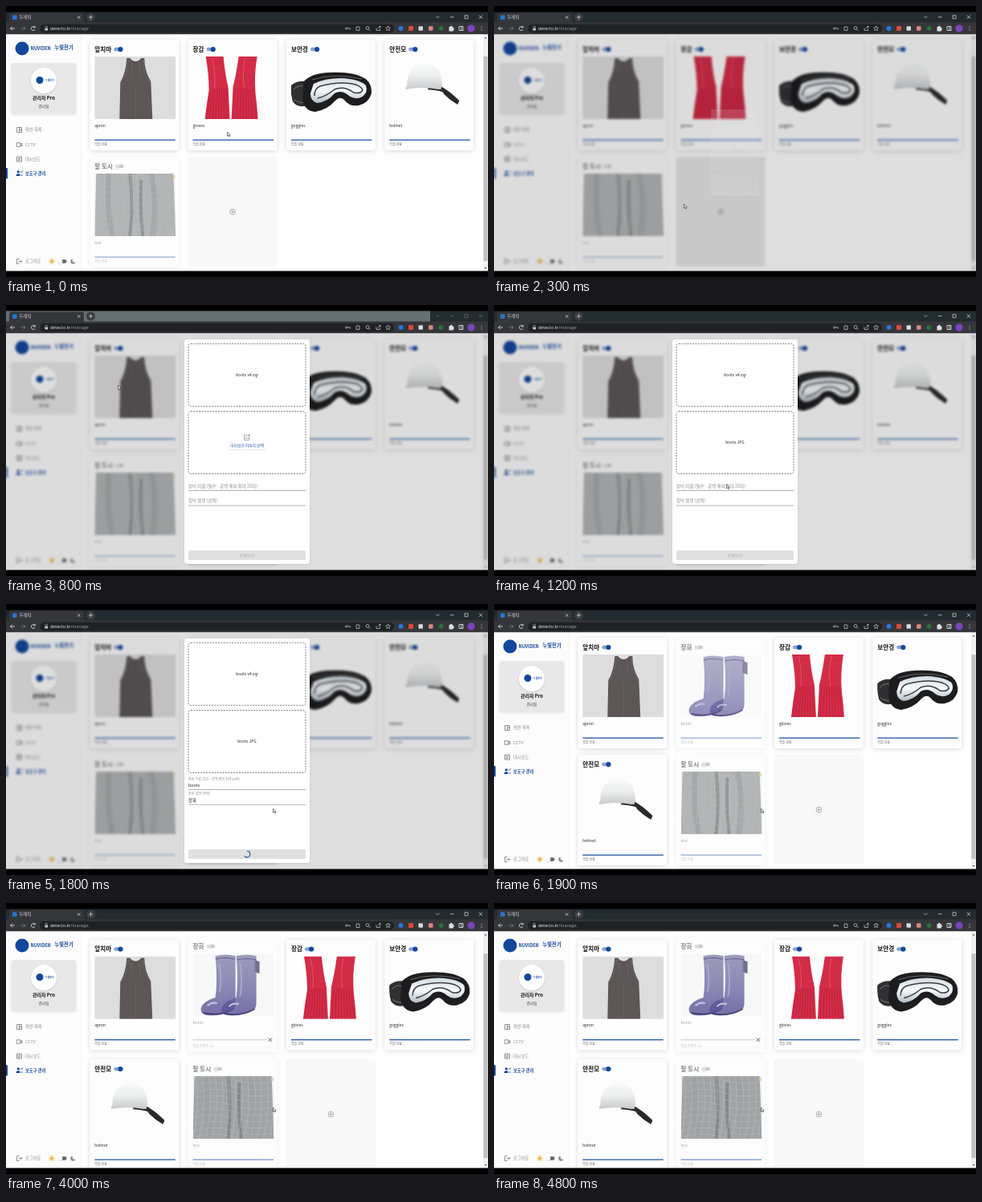
Write an HTML page with a canvas that moves like this. It is 600x338 px and loops after 5 s.

```html
<!DOCTYPE html>
<html lang="ko">
<head>
<meta charset="utf-8">
<title>Equipment manager</title>
<style>
html, body { margin: 0; width: 100%; height: 100%; overflow: hidden; background: #000; }
canvas { display: block; width: 100vw; height: 100vh; }
</style>
</head>
<body>
<canvas id="stage" width="600" height="338"></canvas>
<script>
const W = 600, H = 338, LOOP = 5000, TOP = 35.2, BOTTOM = 330.5;
const BLUE = '#12489c', GREY = '#8b8b8b';
const KR = '"Noto Sans CJK KR", "Noto Sans CJK", sans-serif';
const screen = document.getElementById('stage').getContext('2d');
const layer = Object.assign(document.createElement('canvas'), { width: W, height: H });
const page = layer.getContext('2d');
let g = screen;

function text(s, x, y, size, color = '#222', weight = 400, align = 'left', font = KR) {
  g.font = `${weight} ${size}px ${font}`;
  g.textAlign = align;
  g.textBaseline = 'alphabetic';
  g.fillStyle = color;
  g.fillText(s, x, y + size * 0.36);
  return g.measureText(s).width;
}
function rect(color, x, y, w, h, r = 0) {
  g.fillStyle = color;
  g.beginPath();
  g.roundRect(x, y, w, h, r);
  g.fill();
}
function disc(color, x, y, r) {
  g.fillStyle = color;
  g.beginPath();
  g.arc(x, y, r, 0, 7);
  g.fill();
}
function fill(color, d) {
  g.fillStyle = color;
  g.fill(new Path2D(d));
}
function line(color, width, d) {
  g.strokeStyle = color;
  g.lineWidth = width;
  g.stroke(new Path2D(d));
}
function at(x, y, draw) {
  g.save();
  g.translate(x, y);
  draw();
  g.restore();
}
function shadow(blur, alpha, draw) {
  g.save();
  g.shadowColor = `rgba(0,0,0,${alpha})`;
  g.shadowBlur = blur;
  g.shadowOffsetY = 1;
  draw();
  g.restore();
}
function blend(y0, y1, ...colors) {
  const grad = g.createLinearGradient(0, y0, 0, y1);
  colors.forEach((c, i) => grad.addColorStop(i / (colors.length - 1), c));
  return grad;
}

// Item pictures, each in a 101 x 78 box
const pictures = {
  apron() {
    rect('#dedddd', 0, 0, 101, 78);
    fill('#5c5657', 'M40 2L44 2Q47 6 51 6Q55 6 58 2L62 2Q62 18 70 31L72 78L31 78L32 32Q39 20 40 2Z');
    line('#777071', 0.5, 'M33 32Q41 23 42 3M69 32Q61 23 60 3M46 8V24M56 8V24M51 36V78');
  },
  gloves() {
    fill('#d32c47', 'M16 0H38Q40 22 44 38L46 78H15Q17 60 20 42Q20 22 16 0Z');
    fill('#d32c47', 'M57 0H80Q76 24 78 46Q80 62 81 78H48L50 38Q54 22 57 0Z');
    let ribs = '';
    for (let i = 0; i < 8; i++) {
      ribs += `M${22 + i * 2.8} 40L${17 + i * 3.7} 78M${53 + i * 3.1} 40L${51 + i * 3.9} 78`;
    }
    line('#b31c38', 0.6, ribs);
    line('#e6526a', 1, 'M24 2Q29 22 27 40M65 2Q61 22 64 40');
  },
  goggles() {
    fill('#302f31', 'M0 36Q7 30 17 31L23 60Q9 66 2 56Q-1 45 0 36Z');
    line('#77777a', 1, 'M3 41Q9 35 16 37M4 54Q11 59 20 57');
    fill('#1d1d1f', 'M15 32Q24 21 46 20Q78 18 93 28Q101 35 100 46Q97 58 84 61Q73 63 66 54' +
      'Q61 49 55 55Q46 66 30 69Q17 68 14 54Z');
    fill(blend(27, 58, '#d3dde4', '#f6f9fa', '#aebbc5'),
      'M28 34Q42 27 62 27Q85 28 93 36Q96 44 89 50Q80 55 72 49Q63 41 54 46Q46 56 33 58Q24 56 24 46Z');
    line('#3a3d41', 1.5, 'M29 49Q29 40 36 37Q58 31 76 34Q87 36 89 42Q86 47 78 45Q66 36 54 41Q43 50 33 52');
    line('#69696c', 1, 'M26 29Q54 20 88 28');
  },
  helmet() {
    line('#29292b', 2.4, 'M48 40Q66 41 74 46L86 57');
    fill('#29292b', 'M62 36Q74 42 87 55L85 60Q76 55 68 47Z');
    fill(blend(8, 42, '#fafafb', '#eceded', '#c6c8cc'),
      'M22 36Q22 11 44 9Q65 10 66 34Q66 41 61 41Q41 37 21 41Q19 39 22 36Z');
    line('#d3d5d9', 0.8, 'M24 33Q44 30 64 36');
  },
  boots() {
    rect('#f8f8f9', 0, 0, 101, 78);
    fill('#4c4870', 'M77 8L83 10V25L77 23Z');
    const boot = 'M28 3Q40 0 53 3L53 62Q53 70 47 71Q37 78 18 77Q9 76 10 68Q13 59 28 55Q31 34 28 3Z';
    const tone = () => blend(0, 78, '#8482a8', '#6e6ba2', '#504890');
    fill(tone(), boot);
    line('#37316a', 2, 'M13 74Q36 79 51 69');
    at(26, 0, () => {
      fill(tone(), boot);
      line('#37316a', 2, 'M13 75Q36 79 51 69');
      line('#b0add0', 2, 'M33 13Q36 36 33 53');
      line('#e6e4f3', 2, 'M19 66Q24 61 31 63');
    });
    line('#b0add0', 2, 'M33 13Q37 34 33 48');
    line('#dfdcf0', 2, 'M18 65Q24 60 30 62');
    line('#4b467e', 1.2, 'M28 7Q40 4 52 7M55 8Q67 5 79 8');
  },
  sleeves() {
    rect('#ececeb', 0, 0, 101, 78);
    g.save();
    g.clip(new Path2D('M2 0H98L101 78H0Z'));
    rect('#8b9094', 0, 0, 101, 78);
    line('#9ba0a3', 7, 'M18 0Q14 38 22 78M70 0Q79 38 72 78');
    line('#7c8186', 4, 'M44 0Q48 36 44 78M58 8Q56 40 60 78');
    let weft = '', warp = '';
    for (let i = 0; i < 13; i++) {
      const a = 4 + i * 8;
      warp += `M${a} 0Q${a + 5} 36 ${a - 4} 78`;
      weft += `M0 ${a}Q26 ${a - 8} 50 ${a}T101 ${a + 3}`;
    }
    line('#c5c2b4', 0.6, warp);
    line('#b7bac0', 0.6, weft);
    g.restore();
    rect('#d9c38a', 97, 2, 3, 4);
  }
};
const items = {
  apron: ['앞치마', 'apron'], gloves: ['장갑', 'gloves'], goggles: ['보안경', 'goggles'],
  helmet: ['안전모', 'helmet'], boots: ['장화', 'boots', true], sleeves: ['팔 토시', 'tosi', true]
};

function toggle(x, y, on, track = on ? '#86a3d0' : '#999') {
  rect(track, x + 0.5, y - 2.2, 10.5, 4.4, 2.2);
  if (on) return disc(BLUE, x + 8.7, y, 3.1);
  shadow(1.5, 0.15, () => disc('#fff', x + 3, y, 2.9));
}

function card(key, x, y, training, imageAlpha) {
  const [title, label, off] = items[key];
  const h = training === null ? 138 : 144.5;
  shadow(6, off ? 0.08 : 0.16, () => rect('#fdfdfd', x, y, 111, h, 3));
  at(x + 6, y, () => {
    g.globalAlpha = off ? 0.5 : 1;
    const w = text(title, 0, 12, 7.6, '#161616', 700);
    toggle(w + 2.5, 12, !off);
    g.globalAlpha = off ? imageAlpha : 1;
    g.save();
    g.beginPath();
    g.rect(0, 21, 101, 78.5);
    g.clip();
    g.translate(0, 21);
    pictures[key]();
    g.restore();
    g.globalAlpha = off ? 0.4 : 1;
    text(label, 0, 107, 4.9);
    if (training === null) {
      g.globalAlpha = off ? imageAlpha - 0.15 : 1;
      rect('#1a52a4', 0, 124.4, 100.5, 1.4);
      g.globalAlpha = off ? 0.4 : 1;
      text('학습 완료', 0, 130.3, 4, '#666');
    } else {
      rect('#8e8ea0', 0, 128, 92, 1.2);
      text(`학습 진행중 ${training}%`, 0, 136.5, 4, '#666');
      g.globalAlpha = 0.85;
      line('#333', 0.9, 'M94 126.3l4.6 4.6m0 -4.6l-4.6 4.6');
    }
  });
}

function addCard(x, y, hover) {
  rect(hover ? '#e6e6e6' : '#f8f8f9', x, y, 111, 137, 3);
  at(x + 55.5, y + 68.5, () =>
    line('#8c8c8c', 0.7, 'M3.4 0A3.4 3.4 0 1 1 -3.4 0A3.4 3.4 0 1 1 3.4 0M-1.9 0H1.9M0 -1.9V1.9'));
}

function sidebar() {
  shadow(3, 0.1, () => rect('#fcfcfc', 0, TOP, 93, 300));
  disc(BLUE, 20, 53, 8.5);
  text('NUVIDEN', 30.5, 53, 5.6, BLUE, 700);
  text('누빛전기', 60.5, 52, 6.3, BLUE, 700);
  shadow(3, 0.1, () => rect('#e8e8e8', 6.5, 71, 81, 64, 4));
  shadow(3, 0.12, () => disc('#fff', 47, 93, 16));
  disc(BLUE, 42, 92.5, 4.5);
  text('누빛전기', 49, 92.5, 2.9, BLUE, 700);
  text('관리자 Pro', 47, 115, 6, '#161616', 700, 'center');
  text('관리팀', 47, 125.5, 4.8, '#444', 400, 'center');
  const menu = [
    ['위반 목록', 154.5, 'M-3 -3H3V3H-3ZM0 -3V3M0 0H3'],
    ['CCTV', 173, 'M-3.3 -2.3H1.3V2.3H-3.3ZM1.3 -.5L3.5 -2V2L1.3 .5'],
    ['대시보드', 191, 'M-3 -3H3V3H-3ZM-1.6 -1.3H1.6M-1.6 .2H1.6M-1.6 1.6H.5'],
    ['로그아웃', 318.5, 'M0 -3H-3V3H0M-1 0H3.4M1.7 -1.7L3.4 0L1.7 1.7']
  ];
  for (const [name, y, icon] of menu) {
    at(16.5, y, () => line('#777', 0.8, icon));
    text(name, 24, y, 5.3, GREY);
  }
  rect(BLUE, 0, 202, 2, 13.5, [0, 1, 1, 0]);
  disc(BLUE, 15.3, 206.8, 1.6);
  fill(BLUE, 'M12.5 212Q12.5 209.2 15.5 209.2L17.5 210V212Z');
  line(BLUE, 0.9, 'M18 206.5l1 1l2 -2.2M18.5 211h2.3');
  text('보호구 관리', 24, 208.8, 5.3, BLUE, 700);
  disc('#f3b544', 57, 318.5, 2.3);
  g.setLineDash([0.9, 1.77]);
  line('#f3b544', 1.2, 'M60.4 318.5A3.4 3.4 0 1 1 53.6 318.5A3.4 3.4 0 1 1 60.4 318.5');
  g.setLineDash([]);
  toggle(64.5, 318.5, false, '#666');
  fill('#8d8d8d', 'M83 315.4A3.2 3.2 0 1 0 86.5 319.5A2.8 2.8 0 0 1 83 315.4Z');
}

function scrollbar() {
  rect('#f1f1f1', 594, TOP, 6, BOTTOM - TOP);
  rect('#c1c1c1', 594.5, 63, 5, 255);
  fill('#555', 'M595.5 40.5h3l-1.5 -2zM595.5 326h3l-1.5 2z');
}

function drawPage(step) {
  rect('#fff', 0, 0, W, H);
  sidebar();
  const done = step >= 19, tall = step >= 20;
  const order = done
    ? ['apron', 'boots', 'gloves', 'goggles', 'helmet', 'sleeves']
    : ['apron', 'gloves', 'goggles', 'helmet', 'sleeves'];
  const place = i => [104.3 + (i % 4) * 122.3, i < 4 ? 42 : tall ? 195 : 188];
  order.forEach((key, i) => {
    const [x, y] = place(i);
    const training = key === 'boots' && tall ? (step < 31 ? 0 : 1) : null;
    // Shorter cards are centred in a row that holds a taller one
    const centre = tall && i < 4 && training === null ? 3.5 : 0;
    card(key, x, y + centre, training, tall ? 0.78 : 0.62);
  });
  addCard(...place(order.length), step >= 2 && !done);
  scrollbar();
}

function browser(inactive) {
  rect('#000', 0, 0, W, 8);
  rect('#222c30', 0, 7.5, W, 14);
  if (inactive) rect('#667074', 0, 7.5, 528, 14);
  rect('#35363a', 0, 20.5, W, TOP - 20.5);
  rect('#35363a', 4, 8.5, 93, 13, [3, 3, 0, 0]);
  rect('#2377d2', 8, 11.5, 5.5, 5.5, 1);
  text('두레픽', 16.5, 14.3, 5.3, '#dfe1e5');
  line('#ccc', 0.8, 'M89 12.5l3.4 3.4m0 -3.4l-3.4 3.4');
  disc('#3c3d41', 105.5, 14, 5.5);
  line('#ccc', 0.8, 'M103 14h5m-2.5 -2.5v5');
  line(inactive ? '#65666a' : '#ccc', 0.8,
    'M535.3 12.8l2 2l2 -2M553 13.8h4.5M571 11.8h4v4h-4zM588.7 11.7l4.2 4.2m0 -4.2l-4.2 4.2');
  line('#d4d5d8', 0.9, 'M11 28H5.5M8 25.5L5.5 28L8 30.5M36 26.5A2.5 2.5 0 1 0 36 29.5M36.2 25V27H34.2');
  line('#77787c', 0.9, 'M18.5 28H24M21.5 25.5L24 28L21.5 30.5');
  rect('#202124', 42, 22.8, 441, 10.6, 5.3);
  rect('#c4c5c8', 48.3, 27.4, 3.8, 3, 0.4);
  line('#c4c5c8', 0.6, 'M49 27.4V26.3A1.2 1.2 0 0 1 51.4 26.3V27.4');
  const font = '"Open Sans", sans-serif';
  const w = text('detecto.kr', 55, 28, 5.4, '#eee', 400, 'left', font);
  text('/manage', 55 + w, 28, 5.4, '#9aa0a6', 400, 'left', font);
  line('#b9bbbf', 0.8, 'M422.5 28a1.2 1.2 0 1 0 2.4 0a1.2 1.2 0 1 0 -2.4 0M425 28h3.5v1.5' +
    'M436 26h4v4.5h-4zM448 27.5a2 2 0 1 0 4 0a2 2 0 1 0 -4 0M451.5 29l2 2' +
    'M461 27.5v3h4.5v-2M463 28.5l3 -3M464 25.5h2v2' +
    'M475.7 25l.9 1.9l2 .2l-1.5 1.5l.4 2l-1.8 -1l-1.8 1l.4 -2l-1.5 -1.5l2 -.2z');
  disc('#2477df', 491.5, 28, 3);
  rect('#db493c', 501, 25, 6, 6, 1);
  rect('#d6d7d8', 513.5, 25.3, 5.5, 5.5, 1);
  rect('#d9867e', 526, 25.2, 5.5, 5.5, 1);
  disc('#1f7a34', 541.5, 28, 2.8);
  fill('#dcdde0', 'M551.5 26h1.4a1.2 1.2 0 0 1 2.4 0h1.4v1.6a1.2 1.2 0 0 1 0 2.4v1.4h-5.2z');
  line('#dcdde0', 0.9, 'M564 25.5h5v5h-5zM567 25.5v5');
  disc('#7d43bd', 579, 28, 4.6);
  for (const y of [25.8, 28, 30.2]) disc('#ccc', 592, y, 0.6);
}

function prompt(label, y) {
  at(300, y, () => line('#888', 0.7, 'M1 -3H-3.4V3.4H3V-.5M-2.4 2L-1 0L.3 1.4L1.3 .4L2.4 2M2.5 -4V-1M1 -2.5H4'));
  shadow(1.5, 0.12, () => rect('#fff', 277, y + 6, 46, 9, 1.5));
  text(label, 300, y + 10.5, 4.8, '#1f57a8', 500, 'center');
}

function field(label, value, active, y) {
  if (active) {
    text(label, 227, y - 7.6, 4.1, GREY);
    text(value, 227, y + 0.5, 5.4, '#222');
  } else {
    text(label, 227, y, 5.5, GREY);
  }
  rect('#9a9a9a', 227, y + 5.2, 146, 0.7);
}

function modal(step) {
  shadow(3, 0.1, () => rect('#fff', 222, 43, 156, 280, 3));
  g.strokeStyle = '#555';
  g.lineWidth = 0.75;
  g.setLineDash([2, 1.4]);
  for (const y of [48.3, 132.5]) {
    g.beginPath();
    g.roundRect(227, y, 146, 78, 3);
    g.stroke();
  }
  g.setLineDash([]);
  if (step < 7) prompt('학습데이터 파일 선택', 81);
  else text('boots.v4.zip', 300, 87, 4.9, '#222', 400, 'center');
  if (step < 10) prompt('미리보기 이미지 선택', 165);
  else text('boots.JPG', 300, 171.5, 4.9, '#222', 400, 'center');
  const name = 'boots'.slice(0, Math.max(0, (step - 12) * 2));
  field('장비 이름 (필수 - 공백 제외 최대 20자)', name, step >= 13, 226);
  field('장비 설명 (선택)', '장화'.slice(0, Math.max(0, step - 15)), step >= 16, 244.5);
  const ready = step === 17;
  rect(ready ? BLUE : '#e0e0e0', 227, 306, 146, 12, 2);
  if (step < 18) return text('등록하기', 300, 312, 4.9, ready ? '#fff' : '#a9a9a9', 400, 'center');
  g.strokeStyle = BLUE;
  g.lineWidth = 1.1;
  g.beginPath();
  g.arc(300, 312, 3.9, -1.5, 2.5);
  g.stroke();
}

// Pointer stops: step, x, y
const stops = [[0, 276, 158], [2, 237, 248], [3, 237, 248], [5, 297, 98], [6, 140, 101], [7, 298, 175],
  [8, 140, 101], [11, 290, 224], [14, 290, 226], [16, 300, 245], [18, 333, 256], [50, 333, 256]];
function pointer(step) {
  const i = stops.findIndex(s => s[0] > step);
  const [a, x, y] = stops[i - 1], [b, u, v] = stops[i], k = (step - a) / (b - a);
  at(x + (u - x) * k, y + (v - y) * k, () => {
    const d = 'M-.5 -.8V4.2L.7 3.1L1.6 5L2.5 4.6L1.7 2.8H3.2Z';
    fill('#fff', d);
    line('#222', 0.6, d);
  });
}

function render(t) {
  const step = Math.floor(t / 100);
  const open = step >= 3 && step < 19;
  g = page;
  drawPage(step);
  g = screen;
  rect('#fff', 0, 0, W, H);
  g.save();
  g.filter = open ? 'blur(1.5px)' : 'none';
  g.drawImage(layer, 0, 0);
  g.restore();
  if (open) {
    rect('rgba(0,0,0,.13)', 0, TOP, W, H);
    g.save();
    if (step === 3) {
      g.globalAlpha = 0.14;
      g.translate(300, 183);
      g.scale(0.385, 0.385);
      g.translate(-300, -183);
    }
    modal(step);
    g.restore();
  }
  browser(step === 6 || step === 8 || step === 9);
  rect('#000', 0, BOTTOM, W, H - BOTTOM);
  pointer(step);
}

const start = performance.now();
function tick() {
  render((performance.now() - start) % LOOP);
  requestAnimationFrame(tick);
}
tick();
</script>
</body>
</html>
```
